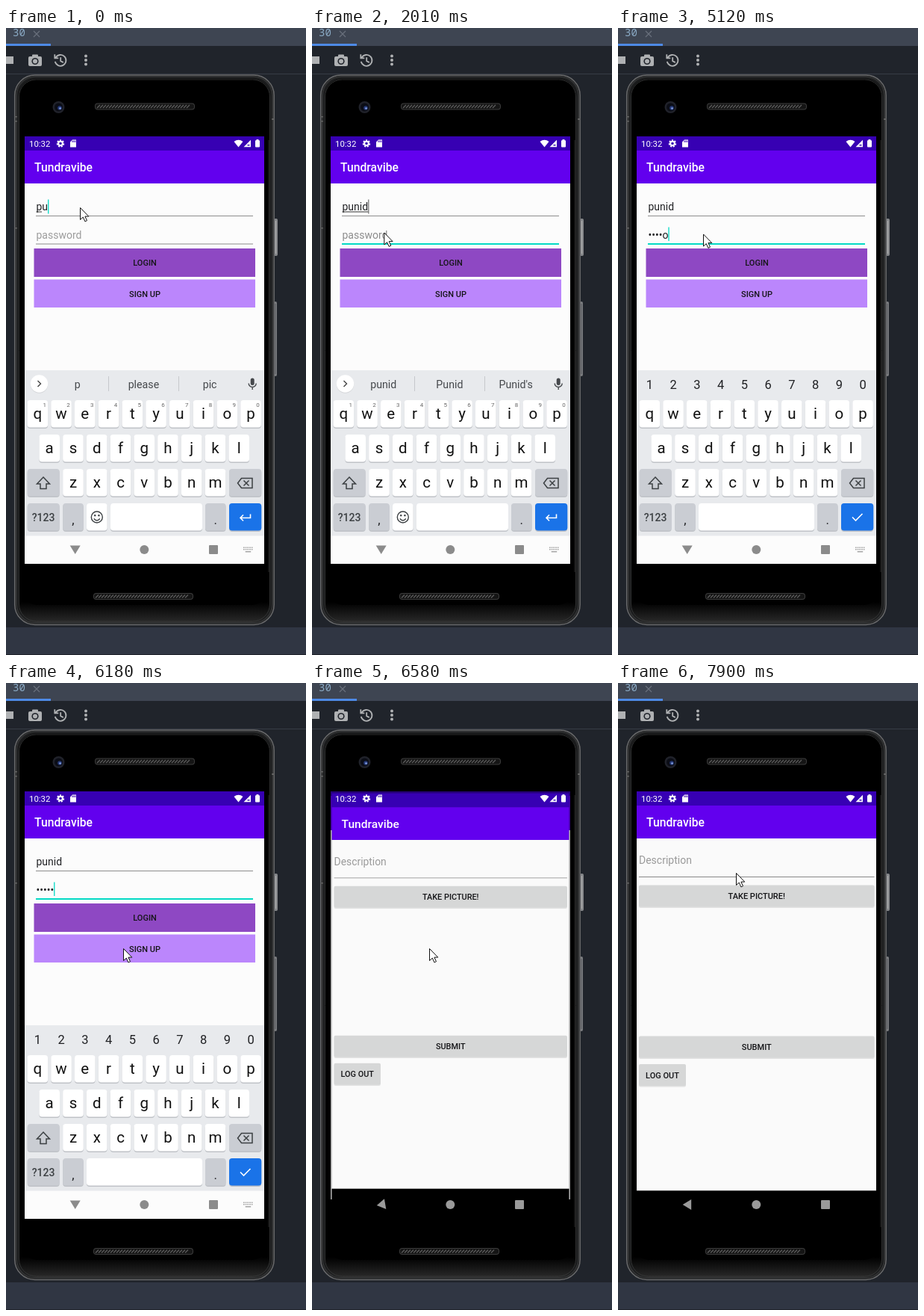
These frames come from a looping animation (402 px wide and 839 px high, 8 s). An HTML page with a canvas:

```html
<!DOCTYPE html>
<html lang="en">
<head>
<meta charset="utf-8">
<title>Login demo</title>
<style>
  html, body { margin: 0; width: 100%; height: 100%; overflow: hidden; background: #20242b; }
  canvas { display: block; }
</style>
</head>
<body>
<canvas id="stage" width="402" height="839"></canvas>
<script>
const ctx = document.getElementById('stage').getContext('2d');
const LOOP = 8000;
const TEAL = '#03dac5', INK = '#202124', PAGE = '#fcfcfc';

// Tracks hold [time, value...] and step hard from one entry to the next.
const pointerTrack = [
  [0, 99.5, 240.5], [1290, 100.5, 240.5], [1440, 102.5, 242.5], [1710, 103, 267],
  [1860, 96.8, 274], [2160, 97.8, 273.5], [4690, 113, 276.5], [5120, 114.5, 276],
  [5270, 124, 296], [5390, 140, 325], [5510, 153, 348], [5630, 157.5, 355.5],
  [7420, 166, 335], [7540, 180, 300], [7660, 186, 280], [7780, 172, 262], [7900, 158.5, 254.5]
];
const nameTrack = [[0, 'pu'], [580, 'pun'], [740, 'puni'], [860, 'punid']];
const hintTrack = [
  [0, 'p', 'please', 'pic'], [150, 'pu', 'put', 'pull'], [580, 'pun', 'punch', 'punk'],
  [740, 'puni', 'punish', 'Punic'], [860, 'puni', 'Punid', "Punid's"], [1010, 'punid', 'Punid', "Punid's"]
];
const nameCaretTrack = [[0, TEAL], [1440, ''], [1860, '#777'], [2160, '']];
const passTrack = [[0, ''], [3050, 'p'], [3450, '•e'], [3700, '••d'], [3990, '•••i'], [4110, '••••o'], [5270, '•••••']];
const passCaretTrack = [[0, 0], [2160, 1], [2590, 0], [3050, 1], [4690, 0], [5120, 1], [5630, 0], [6180, 1]];
const zoomTrack = [[0, 1, 431], [6460, 1.007, 431], [6580, 0.99, 397], [6700, 0.998, 397], [6850, 1, 397]];
const backAngleTrack = [[0, 0], [6580, 1.4], [6700, Math.PI / 2]];

const at = (track, t) => track.findLast(entry => entry[0] <= t).slice(1);

function box(x, y, w, h, color, r = 0) {
  ctx.fillStyle = color;
  ctx.beginPath();
  ctx.roundRect(x, y, w, h, r);
  ctx.fill();
}

function outline(x, y, w, h, r, color, width) {
  ctx.strokeStyle = color;
  ctx.lineWidth = width;
  ctx.beginPath();
  ctx.roundRect(x, y, w, h, r);
  ctx.stroke();
}

function disc(x, y, r, color) {
  ctx.fillStyle = color;
  ctx.beginPath();
  ctx.arc(x, y, r, 0, 7);
  ctx.fill();
}

function shape(d, x, y, fill, stroke, width = 1) {
  const path = new Path2D(d);
  ctx.save();
  ctx.translate(x, y);
  if (fill) { ctx.fillStyle = fill; ctx.fill(path); }
  if (stroke) { ctx.strokeStyle = stroke; ctx.lineWidth = width; ctx.stroke(path); }
  ctx.restore();
}

function text(s, x, y, size, color = INK, align = 'left', weight = 400, family = 'Roboto, sans-serif') {
  ctx.font = `${weight} ${size}px ${family}`;
  ctx.fillStyle = color;
  ctx.textAlign = align;
  ctx.fillText(s, x, y);
  return ctx.measureText(s).width;
}

const label = (s, x, y) => text(s, x, y, 11, '#151518', 'center', 500);

function drawDesk() {
  box(0, 0, 402, 839, '#20242b');
  box(0, 0, 402, 24, '#3e4552');
  box(0, 21, 60, 3, '#4e8ae6');
  text('30', 9, 11, 14, '#8aa9c4', 'left', 400, '"Noto Sans Mono", monospace');
  shape('M-4 -4L4 4M4 -4L-4 4', 41, 8, null, '#69707c', 1.2);
  box(0, 61, 402, 1, '#373c46');
  box(0, 802, 402, 37, '#303643');
  box(0, 838, 402, 1, '#20242b');

  const gray = '#afb1b3';
  box(-2, 38, 12, 10, gray);
  box(30, 38, 18, 13, gray, 2);
  box(35, 35.5, 8, 4, gray, 1);
  disc(39, 44.5, 4.6, '#20242b');
  disc(39, 44.5, 3, gray);
  shape('M-6.4 -3.6A7.4 7.4 0 1 1 -7.2 1.6M-7.7 -8V-3H-2.7M.2 -4V.8L3.8 2.8', 73, 43.3, null, gray, 1.8);
  for (const y of [37.5, 43, 48.5]) disc(107, y, 2, gray);
}

function speaker(x, y) {
  box(x, y, 134, 9, '#3c3c3c', 4);
  box(x + 1, y + 1, 132, 7, '#151515', 3);
  for (let i = 4; i < 128; i += 4) shape('M0 6L4 2', x + i - 1, y + .5, null, '#5d5d5d', 1.3);
}

function drawPhone() {
  box(359, 255, 5, 50, '#85878a', 2);
  box(359, 366, 4, 100, '#7b7d80', 2);
  box(361, 258, 1, 44, '#b0b0b0');
  box(360.5, 369, 1, 94, '#55575a');
  box(11, 62, 349, 737, '#1b1c1d', 28);
  outline(11.7, 63, 347.5, 735.5, 27, '#6a6b6d', 1.5);
  outline(14, 65, 343, 731, 25, '#303132', 2);
  const glass = ctx.createLinearGradient(0, 768, 0, 797);
  glass.addColorStop(0, '#000');
  glass.addColorStop(1, '#2c2c2c');
  box(17, 68, 337, 727, glass, 24);
  outline(17.5, 69, 336, 725, 23, '#3a3b3c', .8);
  box(20, 74, 331, 698, '#000', 22);
  box(351.5, 150, 1, 578, '#2b2b2b');
  for (const y of [118, 124, 267]) box(11, y, 4, 1.5, '#606060');
  box(356, 121, 4, 2, '#606060');

  disc(70.5, 106, 8, '#20222a');
  disc(70.5, 106, 5.5, '#0b0d16');
  disc(72, 107, 2.8, '#263a78');
  disc(72.5, 107.5, 1.2, '#8fa8e8');
  speaker(119, 100.5);
  speaker(117, 756);
}

function drawStatusIcons() {
  text('10:32', 31, 159, 11.4, '#fff');
  ctx.setLineDash([2, 1.66]);
  shape('M4.2 0A4.2 4.2 0 1 1 -4.2 0A4.2 4.2 0 1 1 4.2 0', 73, 154.5, null, '#fff', 2);
  ctx.setLineDash([]);
  shape('M2.8 0A2.8 2.8 0 1 1 -2.8 0A2.8 2.8 0 1 1 2.8 0', 73, 154.5, null, '#fff', 2);
  shape('M3 0H8V10H0V3Z', 86, 149.5, '#fff');
  for (const x of [88.5, 90.4, 92.3]) box(x, 150.5, 1, 2.5, '#3700b3');
  shape('M0 2.6Q6 -2 12 2.6L6 10Z', 305.5, 149.5, '#fff');
  shape('M9.5 0V9.5H0Z', 318.5, 149.8, '#fff');
  box(323.5, 156, 3, 1.5, '#3700b3');
  box(334, 150.3, 6, 9.2, '#fff', 1);
  box(335.6, 149, 2.8, 2, '#fff');
}

function drawWindow(t) {
  box(25, 145, 321, 19, '#3700b3');
  box(25, 164, 321, 44, '#6200ee');
  box(25, 208, 321, 471.5, t < 6460 ? PAGE : '#fafafa');
  box(25, 679.5, 321, 38, '#000');
  text('Tundravibe', 38, 192, 15.7, '#fff', 'left', 500);
  if (t < 6580) drawLogin(t);
  else drawPost();
}

function drawLogin(t) {
  const [name] = at(nameTrack, t), [pass] = at(passTrack, t);
  const nameEnd = 40.5 + text(name, 40.5, 244, 14);
  if (t < 2160) box(40.5, 245.5, (t < 150 ? 48 : nameEnd) - 40.5, 1, '#333');
  const [nameCaret] = at(nameCaretTrack, t);
  if (nameCaret) box(nameEnd, 229.5, 1.3, 19, nameCaret);
  box(40, 251, 291, 1, '#8c8c8c');

  const passWidth = pass ? text(pass, 40.5, 282, 14) : 0;
  if (!pass) text('password', 40.5, 282, 14, t < 2010 ? '#9c9c9c' : '#8c8c8c');
  if (at(passCaretTrack, t)[0]) box(40.5 + passWidth, 266.5, 1.3, 18.5, TEAL);
  if (t < 2010) box(40, 288.5, 291, 1, '#8c8c8c');
  else box(40, 288, 291, 2, TEAL);

  box(37.5, 295, 296.5, 38, '#8e48c3');
  label('LOGIN', 186, 318);
  box(37.5, 336.5, 296.5, 37.5, '#bb86fc');
  label('SIGN UP', 186, 360);
}

function raisedButton(s, x, y, w) {
  box(x, y + 1, w, 29.5, '#e2e2e2', 2);
  box(x, y, w, 29, '#d6d7d7', 2);
  label(s, x + w / 2, y + 18.5);
}

function drawPost() {
  text('Description', 28, 242, 14, '#9a9a9a');
  box(28, 259, 315.5, 1, '#888');
  raisedButton('TAKE PICTURE!', 28, 270.5, 315.5);
  raisedButton('SUBMIT', 28, 472.5, 315.5);
  raisedButton('LOG OUT', 28, 510, 63);
}

function key(x, y, w, color = '#fff') {
  box(x, y + 1, w, 37, '#bfc2c7', 4);
  box(x, y, w, 36.5, color, 4);
}

function keyRow(letters, center, y, digits) {
  [...letters].forEach((letter, i) => {
    const x = center + i * 31.75;
    key(x - 13.8, y, 27.6);
    text(letter, x, y + 25.2, 20.5, '#111', 'center');
    if (digits) text((i + 1) % 10, x + 9.5, y + 9, 8, '#666', 'center');
  });
}

function drawKeyboard(t) {
  const secret = t >= 2160, shade = '#cacdd3';
  box(25, 458, 321, 222, '#e8eaed');
  if (secret) {
    for (let i = 0; i < 10; i++) text((i + 1) % 10, 42.3 + i * 31.75, 483, 16.5, INK, 'center');
  } else {
    disc(44.5, 477, 11.7, '#d4d6d9');
    disc(44.5, 476, 11.7, '#fff');
    shape('M-2 -4L2 0L-2 4', 44.5, 476, null, '#444', 1.4);
    at(hintTrack, t).forEach((word, i) => text(word, 95.7 + i * 88.7, 481.5, 14.2, '#45484c', 'center'));
    box(137, 466, 1, 20, '#c6c8cc');
    box(231, 466, 1, 20, '#c6c8cc');
    box(327.7, 468.5, 5, 9.5, '#45484c', 2.5);
    shape('M-5 0A5 5 0 0 0 5 0M0 5V8.5', 330.2, 475.5, null, '#45484c', 1.4);
  }
  keyRow('qwertyuiop', 42.3, 498, !secret);
  keyRow('asdfghjkl', 58.2, 544);
  keyRow('zxcvbnm', 90, 590);

  key(28.7, 590, 43, shade);
  shape('M0 -8L8.5 1H4V7.5H-4V1H-8.5Z', 50, 609, null, '#3c4043', 1.5);
  key(299, 590, 43.3, shade);
  shape('M-10 0L-5 -6.5H9.5V6.5H-5ZM-2 -3.5L5 3.5M5 -3.5L-2 3.5', 320.5, 609, null, '#3c4043', 1.5);

  key(28.7, 636, 43, shade);
  text('?123', 50, 659.7, 14, '#3c4043', 'center', 500);
  key(76.2, 636, 27.6, shade);
  text(',', 90, 664, 17, INK, 'center');
  if (secret) key(108, 636, 155);
  else {
    key(108, 636, 27.6);
    shape('M7.5 0A7.5 7.5 0 1 1 -7.5 0A7.5 7.5 0 1 1 7.5 0M-4 2Q0 7 4 2', 121.8, 654.5, null, '#3c4043', 1.4);
    disc(119.2, 652.3, 1.2, '#3c4043');
    disc(124.4, 652.3, 1.2, '#3c4043');
    key(140, 636, 123);
  }
  key(267, 636, 27.6, shade);
  text('.', 280.8, 664, 17, INK, 'center');
  key(299, 636, 43.3, '#1a73e8');
  shape(secret ? 'M-6.5 0L-2 4.5L7 -4.5' : 'M7 -4V1H-6M-2.5 -3L-6.5 1L-2.5 5', 320.5, 654.5, null, '#fff', 1.6);
}

function drawNav(t) {
  const light = t < 6460;
  const color = light ? '#8b8b8b' : t < 6580 ? '#505050' : '#9a9a9a';
  if (light) {
    box(25, 679.5, 321, 37.5, PAGE);
    for (let i = 0; i < 5; i++) for (const y of [694.5, 697]) box(318 + i * 2.7, y, 1.7, 1.5, '#a5a5a5');
    box(320.7, 700, 7.5, 1.5, '#a5a5a5');
  }
  ctx.save();
  ctx.translate(92.7, 698);
  ctx.rotate(at(backAngleTrack, t)[0]);
  shape('M-7 -5.5H7L0 6Z', 0, 0, color);
  ctx.restore();
  disc(185.3, 698, 6, color);
  box(272, 692, 12, 12, color, 1);
}

// The dimmed, enlarged login window that shows around the opening one.
function drawLeavingWindow() {
  box(25, 145, 321, 6, '#250078');
  box(25, 151, 321, 46, '#4100a0');
  box(25, 197, 321, 494, '#aaa');
}

function drawScreen(t) {
  const [zoom, cy] = at(zoomTrack, t), cx = 185.5;
  ctx.save();
  ctx.beginPath();
  ctx.rect(25, 145, 321, 572);
  ctx.clip();
  if (t >= 6580 && t < 6700) drawLeavingWindow();
  ctx.save();
  ctx.translate(cx, cy);
  ctx.scale(zoom, zoom);
  ctx.translate(-cx, -cy);
  drawWindow(t);
  ctx.restore();
  if (t < 6460) drawKeyboard(t);
  drawStatusIcons();
  drawNav(t);
  ctx.restore();
}

function drawPointer(t) {
  shape('M0 0V16L3.8 12.6L6.4 18.4L9 17.2L6.4 11.6H11.3Z', ...at(pointerTrack, t), '#fff', '#111', 1);
}

function frame() {
  const t = performance.now() % LOOP;
  drawDesk();
  drawPhone();
  drawScreen(t);
  drawPointer(t);
  requestAnimationFrame(frame);
}
frame();
</script>
</body>
</html>
```
